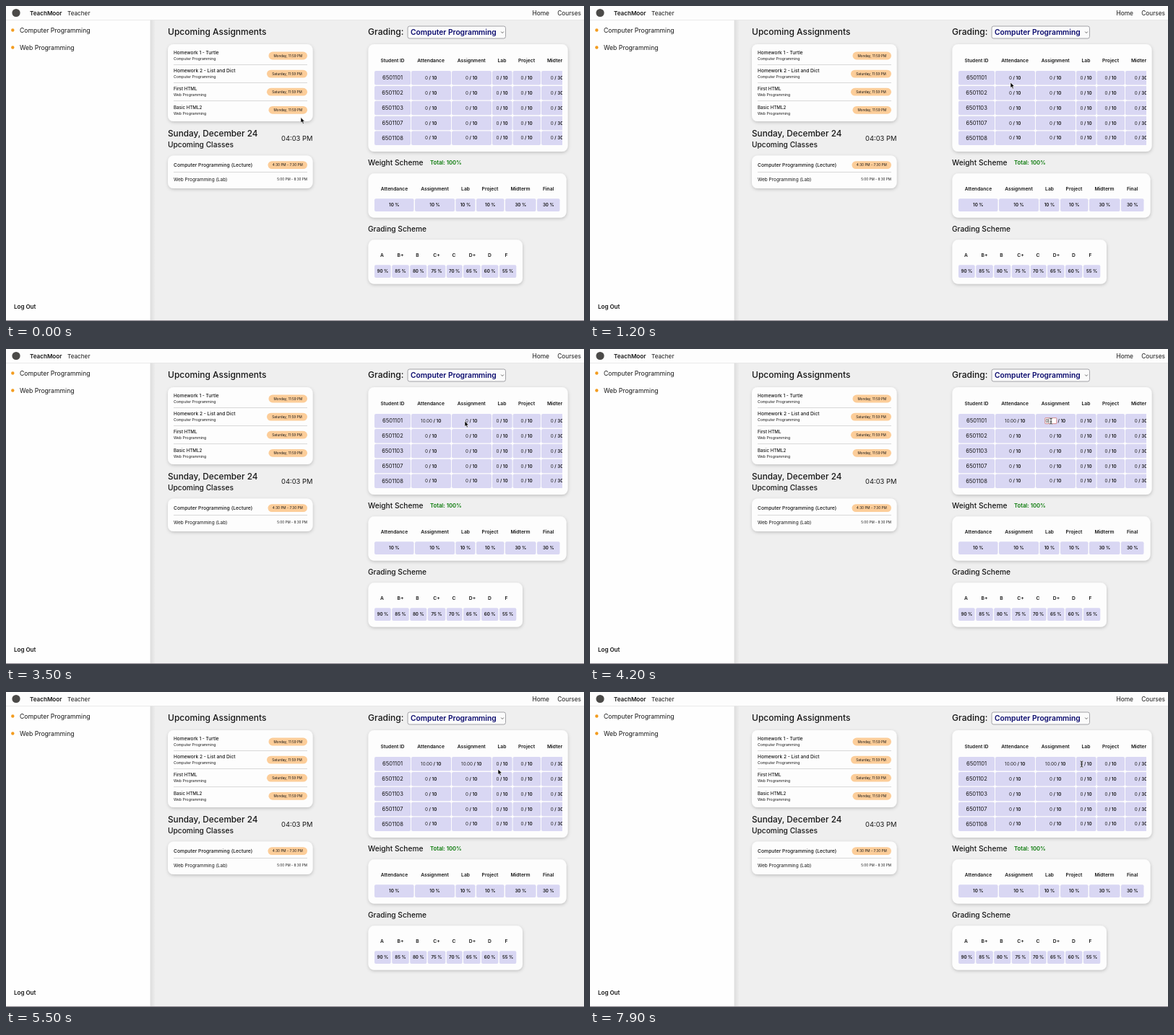
An HTML page that plays this animation: 800x437 px, repeating every 8000 ms.

```html
<!DOCTYPE html>
<html lang="en">
<head>
<meta charset="utf-8">
<title>Teacher dashboard</title>
<style>
  html, body { margin: 0; width: 100%; height: 100%; overflow: hidden; background: #efefef; }
  svg { display: block; width: 100%; height: 100%; }
  text { font-family: Inter, "Open Sans", sans-serif; }
</style>
</head>
<body>
<svg id="stage" viewBox="0 0 800 437" xmlns="http://www.w3.org/2000/svg">
  <defs>
    <filter id="soft" x="-10%" y="-20%" width="120%" height="150%">
      <feDropShadow dx="0.4" dy="1.6" stdDeviation="2" flood-color="#000" flood-opacity="0.2"/>
    </filter>
    <linearGradient id="edge">
      <stop offset="0" stop-color="#000" stop-opacity="0.07"/>
      <stop offset="1" stop-color="#000" stop-opacity="0"/>
    </linearGradient>
    <clipPath id="tableClip"><rect x="509" y="60" width="261" height="140"/></clipPath>
  </defs>
</svg>
<script>
const NS = 'http://www.w3.org/2000/svg';
const LOOP = 8000;
const INK = '#161616', LILAC = '#d9d7f3', PEACH = '#fccd99';
const stage = document.getElementById('stage');

function add(tag, attrs, parent = stage) {
  const el = document.createElementNS(NS, tag);
  for (const key in attrs) el.setAttribute(key, attrs[key]);
  return parent.appendChild(el);
}

function rect(x, y, x2, y2, fill, rx = 0, extra = {}, parent = stage) {
  return add('rect', { x, y, width: x2 - x, height: y2 - y, fill, rx, ...extra }, parent);
}

// y is the middle of the capitals
function label(str, x, y, size, weight = 400, anchor = 'start', fill = INK, parent = stage) {
  const el = add('text', {
    x, y: y + size * 0.36, 'font-size': size, 'font-weight': weight, 'text-anchor': anchor, fill
  }, parent);
  el.textContent = str;
  return el;
}

const card = (x, y, x2, y2) => rect(x, y, x2, y2, '#fdfdfd', 8, { filter: 'url(#soft)' });
const divider = y => rect(232, y - 0.35, 417, y + 0.35, '#c9c9c9');

function pill(str, x, y) {
  rect(x, y - 5.4, 417, y + 5.4, PEACH, 5.4);
  label(str, (x + 417) / 2, y, 4.7, 400, 'middle');
}

function drawFrame() {
  rect(0, 0, 800, 437, '#efefef');
  rect(200, 19, 207, 437, 'url(#edge)');
  rect(0, 19, 200, 437, '#fefefe');
  rect(199.6, 19, 200.4, 437, '#dcdcdc');
  rect(0, 0, 800, 19.5, '#fdfdfd');
  rect(0, 19.3, 800, 20, '#e3e3e3');

  add('circle', { cx: 14, cy: 9.5, r: 5.6, fill: '#4b4a48' });
  label('TeachMoor', 33, 9.6, 8.1, 600);
  label('Teacher', 85, 9.6, 8.2);
  label('Home', 752, 9.6, 8.4, 400, 'end');
  label('Courses', 796, 9.6, 8.35, 400, 'end');

  ['Computer Programming', 'Web Programming'].forEach((name, i) => {
    add('circle', { cx: 9.3, cy: 33.5 + i * 24, r: 2.2, fill: '#f39c1f' });
    label(name, 19, 33.6 + i * 24, 8.65);
  });
  label('Log Out', 11, 417, 8, 600);
}

function drawAgenda() {
  label('Upcoming Assignments', 224, 36, 12, 500);
  card(224, 53, 424.5, 160);
  const work = [
    ['Homework 1 - Turtle', 'Computer Programming', 'Monday', 6.5],
    ['Homework 2 - List and Dict', 'Computer Programming', 'Saturday', 6.6],
    ['First HTML', 'Web Programming', 'Saturday', 6.2],
    ['Basic HTML2', 'Web Programming', 'Monday', 6.2]
  ];
  work.forEach(([title, course, day, size], i) => {
    const y = 65 + i * 25.1;
    label(title, 232, y, size, 500);
    label(course, 232, y + 8.4, 5.17);
    pill(day + ', 11:59 PM', day === 'Monday' ? 363.5 : 361, y + 4);
    if (i) divider(y - 8.6);
  });

  label('Sunday, December 24', 224, 176.5, 11.75, 500);
  label('Upcoming Classes', 224, 192, 10.2, 450);
  label('04:03 PM', 424.5, 183.6, 9.4, 400, 'end');

  card(224, 207.5, 424.5, 253);
  label('Computer Programming (Lecture)', 232, 220.5, 6.8, 500);
  pill('4:30 PM - 7:30 PM', 362.5, 220.6);
  divider(230.5);
  label('Web Programming (Lab)', 232, 240.5, 6.48);
  label('5:00 PM - 8:30 PM', 417, 240.6, 4.68, 400, 'end');
}

// One score: its value with the maximum, or an open input field
function makeScore(cx, cy, max, parent) {
  const shown = label('', cx, cy, 6.25, 400, 'middle', '#2b2b2b', parent);
  const value = add('tspan', {}, shown);
  const limit = add('tspan', { 'font-weight': 600, fill: INK }, shown);
  limit.textContent = ' / ' + max;
  value.textContent = '0';

  let field, typed, caret;
  return function set(state) {
    if (!field) {
      field = add('g', {}, parent);
      rect(cx - 14.4, cy - 4, cx + 1.6, cy + 4, '#fff', 0.6,
        { stroke: '#c9615f', 'stroke-width': 0.7 }, field);
      typed = label('', cx - 13.7, cy, 6.25, 400, 'start', '#2b2b2b', field);
      caret = rect(0, cy - 3.2, 0.6, cy + 3.2, '#111', 0, {}, field);
      label('/ ' + max, cx + 14, cy, 6.25, 600, 'end', INK, field);
    }
    field.setAttribute('display', state.open ? 'inline' : 'none');
    shown.setAttribute('display', state.open ? 'none' : 'inline');
    if (state.open) {
      typed.textContent = state.text;
      const end = state.text ? typed.getComputedTextLength() : 0;
      caret.setAttribute('x', cx - 13.5 + end);
    } else {
      value.textContent = state.text;
    }
  };
}

function drawGrades() {
  label('Grading:', 501, 36, 12.1, 500);
  rect(556, 28, 691.5, 45, '#fbfbfb', 2.6, { stroke: '#8f8f94', 'stroke-width': 0.8 });
  label('Computer Programming', 560, 36.3, 10.25, 600, 'start', '#0a0a6e');
  add('path', {
    d: 'M685.2 35.6l1.8 1.9l1.8-1.9', fill: 'none', stroke: '#444', 'stroke-width': 0.8
  });

  card(501.5, 53, 777.5, 202);
  const table = add('g', { 'clip-path': 'url(#tableClip)' });
  const columns = [
    ['Student ID', 510, 560, 535], ['Attendance', 561, 616, 588.2],
    ['Assignment', 617, 672, 644.2], ['Lab', 673, 700.6, 686.5],
    ['Project', 701.6, 740, 720.5], ['Midterm', 741, 785, 762.6]
  ];
  const ids = [1, 2, 3, 7, 8];
  const open = [];
  columns.forEach(([name, x, x2, cx], c) => {
    label(name, cx, 75.2, c ? 6.75 : 6.5, 600, 'middle', INK, table);
    ids.forEach((id, r) => {
      const y = 90 + r * 20.9, cy = y + 9.6;
      rect(x, y, x2, y + 19.5, LILAC, 2, {}, table);
      if (!c) return label('650110' + id, cx, cy, 7.6, 400, 'middle', INK, table);
      const set = makeScore(cx, cy, c === 5 ? 30 : 10, table);
      if (r === 0 && (c === 1 || c === 2)) open.push(set);
    });
  });
  return open;
}

// columns: name, left, right, middle of the heading, percentage
function drawScheme(title, y, right, columns) {
  label(title, 501, y, 10.2, 500);
  card(501.5, y + 15.3, right, y + 76.5);
  columns.forEach(([name, x, x2, cx, share]) => {
    label(name, cx, y + 36.7, 6.7, 600, 'middle');
    rect(x, y + 50.2, x2, y + 68, LILAC, 2);
    label(share + ' %', (x + x2) / 2, y + 59.1, 6.15, 600, 'middle');
  });
}

drawFrame();
drawAgenda();
const scores = drawGrades();

drawScheme('Weight Scheme', 217, 775.5, [
  ['Attendance', 510, 564.5, 537.5, 10], ['Assignment', 566, 621, 593.5, 10],
  ['Lab', 622.3, 649.5, 636, 10], ['Project', 651, 689.5, 670, 10],
  ['Midterm', 691, 733.5, 712, 30], ['Final', 735, 766.5, 750.6, 30]
]);
label('Total: 100%', 587, 217.3, 7.7, 600, 'start', '#0a7a0a');

drawScheme('Grading Scheme', 309, 715, [
  ['A', 510, 532.7, 520.5, 90], ['B+', 534.2, 557.8, 546, 85],
  ['B', 559.2, 582.3, 569.5, 80], ['C+', 583.8, 608.3, 596, 75],
  ['C', 609.8, 631.6, 620, 70], ['D+', 633, 656.6, 645.5, 65],
  ['D', 658, 681.4, 669.5, 60], ['F', 682.9, 706.3, 692.5, 55]
]);
rect(0, 436, 800, 437, '#87828a');

const arrow = add('path', {
  d: 'M0 0V7.6L1.7 6L3 8.9L4.3 8.3L3.1 5.6H5.4Z',
  fill: '#000', stroke: '#fff', 'stroke-width': 0.6, 'stroke-linejoin': 'round'
});
const beam = add('g', { fill: 'none', 'stroke-linecap': 'round' });
for (const [stroke, width] of [['#fff', 1.5], ['#111', 0.8]]) {
  add('path', {
    d: 'M-1.6-4Q0-4 0-3Q0-4 1.6-4M0-3V3M-1.6 4Q0 4 0 3Q0 4 1.6 4M-.9 1H.9',
    stroke, 'stroke-width': width
  }, beam);
}

// time, x, y, pointer shape from that time on
const track = [
  [0, 408, 154.5, 'arrow'], [200, 408, 154.5, 'arrow'], [1000, 582, 106, 'arrow'],
  [1250, 582, 106, 'arrow'], [1500, 581.5, 100, 'beam'], [2000, 581.5, 100, 'none'],
  [2900, 583, 101, 'beam'], [3100, 590, 101, 'arrow'], [3500, 635, 100, 'arrow'],
  [3700, 638, 100, 'beam'], [4300, 638, 100, 'none'], [5000, 640, 101, 'arrow'],
  [5450, 681, 107, 'arrow'], [5600, 681, 107, 'arrow'], [5900, 680.5, 100, 'beam'],
  [LOOP, 680.5, 100, 'beam']
];

// time, text, field open
const edits = [
  [[0, '0'], [1700, '0', true], [2000, '', true], [2100, '1', true], [2300, '10', true], [2800, '10.00']],
  [[0, '0'], [3900, '0', true], [4300, '', true], [4400, '1', true], [4600, '10', true], [4950, '10.00']]
];

const smooth = k => k * k * (3 - 2 * k);
const lastBefore = (list, t) => list.findLastIndex(step => step[0] <= t);

function render(t) {
  const i = Math.min(lastBefore(track, t), track.length - 2);
  const [t0, x0, y0, shape] = track[i];
  const [t1, x1, y1] = track[i + 1];
  const k = smooth((t - t0) / (t1 - t0));
  const place = `translate(${x0 + (x1 - x0) * k} ${y0 + (y1 - y0) * k})`;
  arrow.setAttribute('transform', place);
  beam.setAttribute('transform', place);
  arrow.setAttribute('display', shape === 'arrow' ? 'inline' : 'none');
  beam.setAttribute('display', shape === 'beam' ? 'inline' : 'none');

  scores.forEach((set, n) => {
    const [, text, open] = edits[n][lastBefore(edits[n], t)];
    set({ text, open });
  });
}

const start = performance.now();
function tick() {
  render((performance.now() - start) % LOOP);
  requestAnimationFrame(tick);
}
tick();
</script>
</body>
</html>
```
